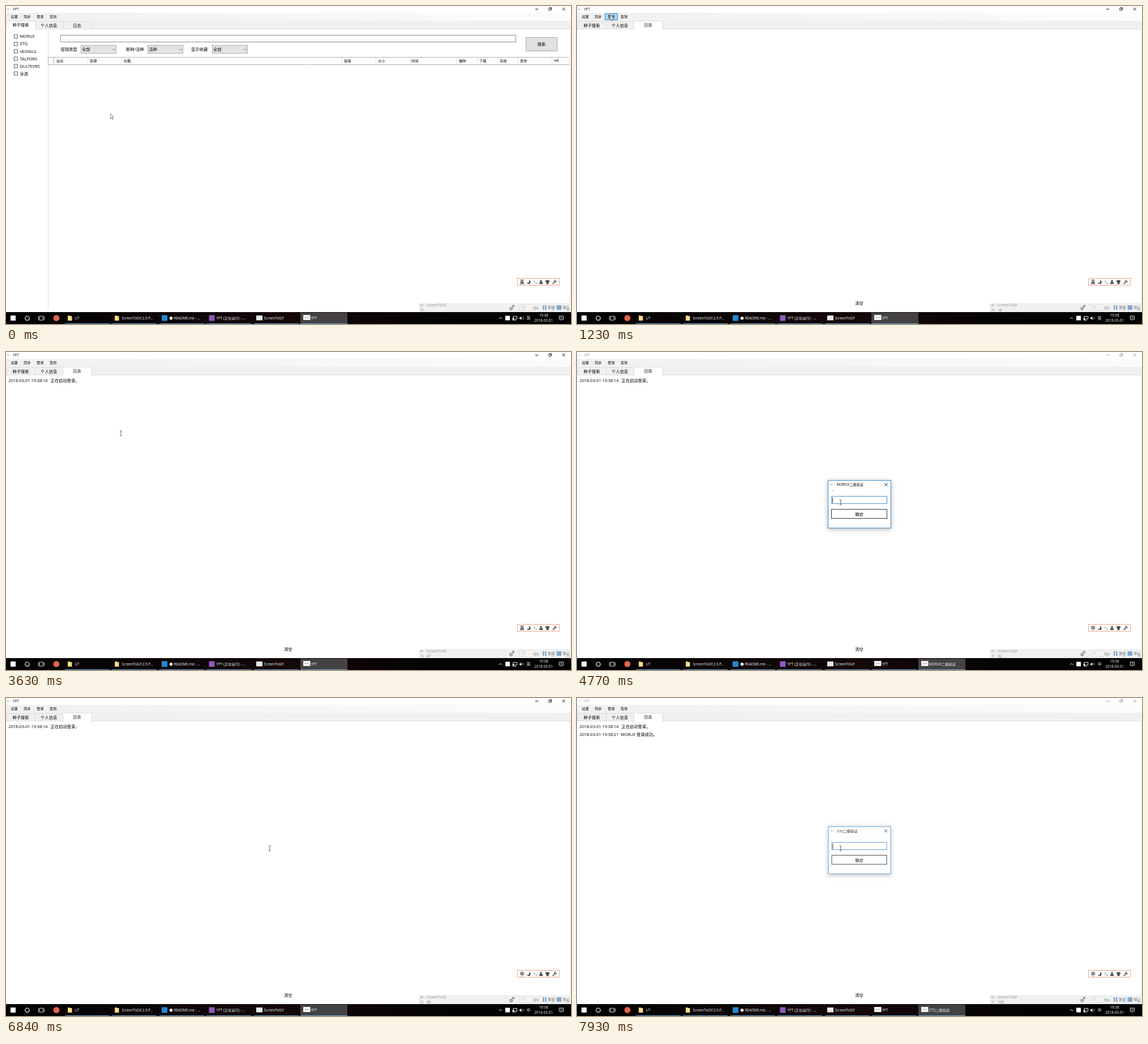
These frames come from a looping animation (998 px wide and 561 px high, 8000 ms). An HTML page with a canvas:

```html
<!DOCTYPE html>
<html lang="zh-CN">
<head>
<meta charset="utf-8">
<title>YPT</title>
<style>
html, body { margin: 0; width: 100%; height: 100%; overflow: hidden; background: #fff; }
canvas { display: block; width: 100vw; height: 100vh; }
</style>
</head>
<body>
<canvas id="stage" width="998" height="561"></canvas>
<script>
const g = document.getElementById('stage').getContext('2d');
const LOOP = 8000, STEP = 1000 / 13;
const FONT = '"Open Sans", "Noto Sans CJK SC", "Noto Sans CJK", sans-serif';
const SMALL = 6.24, BODY = 7.3;
const SITES = ['MORUX', 'ZTQ', 'VEDNILS', 'TALPORS', 'DULTEVRS', '全选'];

function text(s, x, y, size = SMALL, color = '#000', align = 'left', weight = 400) {
  g.font = `${weight} ${size}px ${FONT}`;
  g.fillStyle = color;
  g.textAlign = align;
  g.fillText(s, x, y + size * 0.36);
}
function fill(x, y, w, h, color) {
  g.fillStyle = color;
  g.fillRect(x, y, w, h);
}
function box(x, y, w, h, border, bg) {
  if (bg) fill(x, y, w, h, bg);
  g.strokeStyle = border;
  g.lineWidth = 1;
  g.strokeRect(x + 0.5, y + 0.5, w - 1, h - 1);
}
function line(color, width, ...pts) {
  g.strokeStyle = color;
  g.lineWidth = width;
  g.beginPath();
  for (let i = 0; i < pts.length; i += 2) g.lineTo(pts[i], pts[i + 1]);
  g.stroke();
}
function poly(color, ...pts) {
  g.fillStyle = color;
  g.beginPath();
  for (let i = 0; i < pts.length; i += 2) g.lineTo(pts[i], pts[i + 1]);
  g.closePath();
  g.fill();
}
function disc(x, y, r, color) {
  g.fillStyle = color;
  g.beginPath();
  g.arc(x, y, r, 0, 7);
  g.fill();
}
function ring(x, y, r, color, width = 1) {
  g.strokeStyle = color;
  g.lineWidth = width;
  g.beginPath();
  g.arc(x, y, r, 0, 7);
  g.stroke();
}
function cross(x, y, r, color, width = 0.9) {
  line(color, width, x - r, y - r, x + r, y + r);
  line(color, width, x - r, y + r, x + r, y - r);
}
function blend(...colors) {
  const shade = g.createLinearGradient(0, 0, 998, 0);
  colors.forEach((c, i) => shade.addColorStop(i / (colors.length - 1), c));
  return shade;
}

function titleBar(active) {
  const ink = active ? '#111' : '#999';
  fill(2, 5, 3, 1, active ? '#777' : '#aaa');
  fill(7, 5, 1, 1, '#ccc');
  text('YPT', 12, 5.7, SMALL, ink);
  fill(935, 5, 5, 1, ink);
  g.strokeStyle = ink;
  g.lineWidth = 0.8;
  g.strokeRect(958.8, 4, 3.6, 3.6);
  line(ink, 0.8, 960, 4, 960, 2.8, 963.7, 2.8, 963.7, 6.4, 962.4, 6.4);
  cross(985, 5.4, 2.6, ink);
}

function menu(hover) {
  fill(0, 12, 998, 14, blend('#f0f0f0', '#fcfcfc'));
  if (hover) box(49, 13, 23, 12, '#2a86d0', '#b3d7f3');
  ['设置', '同步', '登录', '签到'].forEach((s, i) => text(s, 8.4 + i * 22.9, 19));
}

function tabs(selected) {
  fill(0, 26, 998, 15, '#f0f0f0');
  line('#dcdcdc', 1, 0, 40.5, 998, 40.5);
  const edges = [1, 51, 101, 150];
  for (let i = 0; i < 3; i++) {
    if (i !== selected) box(edges[i], 27, edges[i + 1] - edges[i] + 1, 14, '#dcdcdc', '#f0f0f0');
  }
  const x = edges[selected] - 1, w = edges[selected + 1] - x + 2;
  box(x, 26, w, 16, '#dcdcdc', '#fff');
  fill(x + 1, 40, w - 2, 3, '#fff');
  ['种子搜索', '个人信息', '日志'].forEach((s, i) =>
    text(s, [26, 75.7, 125.6][i], i === selected ? 33.5 : 34.2, BODY, '#000', 'center'));
}

function combo(label, labelX, x, value) {
  text(label, labelX, 76.7, BODY);
  box(x, 69, 63, 15, '#adadad', '#e3e3e3');
  text(value, x + 2.3, 76.7, BODY);
  line('#444', 0.8, x + 56.3, 75.6, x + 58.5, 77.8, x + 60.7, 75.6);
}

function searchPage() {
  SITES.forEach((s, i) => {
    const y = 53.8 + i * 13.05;
    g.strokeStyle = '#333';
    g.lineWidth = 0.8;
    g.strokeRect(14.3, y - 3, 6, 6);
    text(s, 24.5, y, BODY);
  });
  line('#dcdcdc', 1, 74.5, 43, 74.5, 536);
  box(96, 51, 805, 13, '#8c8c8c', '#fff');
  box(918, 55, 56, 25, '#adadad', '#e1e1e1');
  text('搜索', 945.7, 67.6, BODY, '#000', 'center');
  combo('促销类型', 96.7, 132, '全部');
  combo('断种/活种', 212, 250, '活种');
  combo('显示收藏', 327, 364, '全部');

  line('#b4b4b4', 1, 74, 90.5, 995, 90.5);
  line('#b4b4b4', 1, 74, 103.5, 995, 103.5);
  box(74, 90, 11, 14, '#b4b4b4');
  const heads = { 站点: 85, 资源: 144, 标题: 204, 促销: 593, 大小: 653, 时间: 712,
    做种: 796, 下载: 832, 完成: 868, 发布: 904, HR: 964 };
  for (const [s, x] of Object.entries(heads)) {
    if (x > 85) line('#dedede', 1, x + 0.5, 91, x + 0.5, 103);
    text(s, x + 4, 97.2);
  }
  line('#dedede', 1, 994.5, 91, 994.5, 103);
}

function logPage(rows) {
  if (rows > 0) {
    text('2018-03-01 19:38:14', 4.5, 50.2, BODY);
    text('正在启动登录。', 78.6, 50.2, BODY);
  }
  if (rows > 1) {
    text('2018-03-01 19:38:21', 4.5, 63.9, BODY);
    text(SITES[0] + ' 登录成功。', 77, 63.9, BODY);
  }
  text('清空', 498.5, 524.8, BODY, '#000', 'center');
}

function recorder(count) {
  const ink = '#a4a4a4';
  fill(729, 524, 269, 16, '#f0f0f0');
  line(ink, 0.9, 738.5, 527.8, 732, 527.8);
  line(ink, 0.9, 734.5, 525.3, 732, 527.8, 734.5, 530.3);
  text('ScreenToGif', 743, 528.2, SMALL, '#999');
  cross(734.8, 536, 2.6, '#999', 0.8);
  if (count > 0) text(count, 743.2, 536.3, SMALL, '#6670b0');
  ring(892.3, 533.8, 2, '#808080', 1.6);
  ring(896, 529.3, 1.4, '#808080', 1.4);
  box(906, 526, 25, 12, '#e2e2e2', '#f3f3f3');
  text('15', 909.5, 532.2, SMALL, '#b4b4b4');
  text('fps', 931.8, 532.4, SMALL, '#777');
  fill(948, 528, 2.5, 8, '#83a8cc');
  fill(952, 528, 2.5, 8, '#83a8cc');
  text('暂停', 957, 531.3, SMALL, '#666');
  text('F7', 964, 536.2, 4.6, '#888');
  fill(972.5, 528, 8.5, 8, '#83a8cc');
  text('停止', 983.2, 531.3, SMALL, '#666');
  text('F8', 990, 536.2, 4.6, '#888');
}

function inputBar(lang) {
  const ink = '#444';
  box(903, 480, 75, 13, '#eba58a', '#fff');
  text(lang, 911.6, 487, 7.6, '#333', 'center', 700);
  disc(923.3, 487, 3.3, ink);
  disc(921.7, 485.7, 2.7, '#fff');
  ring(933.2, 486, 0.8, ink, 0.7);
  line(ink, 1, 936.8, 487.8, 936, 490);
  disc(945, 485.2, 1.8, ink);
  fill(942, 487.3, 6, 3, ink);
  poly(ink, 952.5, 485, 954.7, 483.7, 958.2, 483.7, 960.4, 485, 959.4, 487, 958.5, 486.5,
    958.5, 490.5, 954.5, 490.5, 954.5, 486.5, 953.5, 487);
  line(ink, 1.5, 965.6, 490.3, 969.3, 486.6);
  ring(970.5, 485.3, 1.6, ink, 1.3);
  fill(971, 483, 2, 2, '#fff');
}

function folder(x) {
  fill(x, 546, 4, 9, '#e9bd55');
  fill(x + 1, 547, 6.5, 8, '#fbdc8c');
}

function taskButton(x, label, active) {
  if (active) fill(x - 1, 541, 83, 20, '#454243');
  fill(active ? x - 1 : x, 560, active ? 83 : 79, 1, '#6aaee2');
  text(label, x + 17.6, 550.7, SMALL, '#fff');
}

function appIcon(x) {
  fill(x, 545, 12.5, 9, '#f4f4f4');
  fill(x + 2, 549, 8, 1, '#aaa');
}

function taskBar(dialogName, lang) {
  fill(0, 540, 998, 21, blend('#020202', '#0b0506', '#150809', '#050303', '#020202'));
  fill(8, 546, 9, 9, '#fff');
  ring(37.5, 550.7, 3.7, '#fff', 1.2);
  g.strokeStyle = '#e8e8e8';
  g.lineWidth = 0.9;
  g.strokeRect(59, 547.2, 6.5, 7);
  line('#e8e8e8', 0.9, 58, 548, 57.3, 548, 57.3, 553.5, 58, 553.5);
  line('#e8e8e8', 0.9, 66.8, 548, 67.5, 548, 67.5, 553.5, 66.8, 553.5);
  disc(89, 550.5, 5.4, '#e0654c');

  taskButton(104, 'UT');
  taskButton(187, 'ScreenToGif.2.9.P...');
  taskButton(271, '● README.md - ...');
  taskButton(354, 'YPT (正在运行) - ...');
  taskButton(438, 'ScreenToGif');
  taskButton(521, 'YPT', !dialogName);
  folder(109);
  folder(192);
  fill(275, 545.5, 10, 10, '#2389d0');
  fill(358.5, 545.5, 10, 10, '#8b5cb5');
  fill(442, 546, 11, 8.5, '#e6e8ea');
  appIcon(525);
  if (dialogName) {
    taskButton(604, dialogName + '二级验证', true);
    appIcon(608);
  }

  const ink = '#eee';
  line(ink, 1, 870.8, 552, 873.5, 549.2, 876.2, 552);
  fill(882, 546.5, 8, 8, '#fff');
  g.strokeStyle = ink;
  g.lineWidth = 0.9;
  g.strokeRect(896, 547.5, 6.5, 4.7);
  line(ink, 0.9, 897, 554.4, 901, 554.4);
  fill(894.7, 550, 2.4, 4.5, ink);
  poly(ink, 907, 549.5, 908.4, 549.5, 910.5, 547.5, 910.5, 554, 908.4, 552, 907, 552);
  for (const r of [2, 3.8]) {
    g.strokeStyle = '#aaa';
    g.lineWidth = 0.7;
    g.beginPath();
    g.arc(910.5, 550.7, r, -0.8, 0.8);
    g.stroke();
  }
  text(lang, 923, 550.7, 7, '#fff', 'center');
  text('19:38', 949.5, 546, SMALL, '#fff', 'center');
  text('2018-03-01', 949.5, 555.2, SMALL, '#fff', 'center');
  line(ink, 0.9, 977.3, 547, 984.7, 547, 984.7, 552.8, 982.3, 552.8, 981, 554.6, 979.7, 552.8, 977.3, 552.8, 977.3, 546.6);
  line(ink, 0.6, 979, 549, 983, 549);
  line(ink, 0.6, 979, 551, 983, 551);
}

function dialog(name, value, caret, alpha, speck) {
  const k = 0.93 + 0.07 * alpha;
  g.save();
  g.globalAlpha = alpha;
  g.translate(498.75, 268.5);
  g.scale(k, k);
  g.translate(-498.75, -268.5);
  g.save();
  g.shadowColor = 'rgba(0,0,0,0.28)';
  g.shadowBlur = 8;
  g.shadowOffsetY = 2;
  fill(443, 226, 112, 85, '#fff');
  g.restore();
  box(443, 226, 112, 85, '#3d8fd1', '#fff');
  fill(448, 233.5, 3, 1, '#777');
  fill(453, 233.5, 1, 1, '#ccc');
  text(name + '二级验证', 458.6, 234.2);
  cross(546, 234, 2.7, '#222');
  if (speck) fill(451, 244, 2.5, 1, '#999');
  box(449, 254, 99, 14, '#4a94d4', '#fff');
  text(value, 450.8, 261.7, BODY);
  if (caret) {
    g.font = `400 ${BODY}px ${FONT}`;
    fill(451 + g.measureText(value).width, 256.5, 0.9, 10, '#111');
  }
  box(449, 277, 99, 17, '#333', '#fff');
  text('确定', 498.5, 286.2, BODY, '#000', 'center');
  g.restore();
}

function arrow(x, y) {
  const shape = [0, 0, 0, 8.6, 2, 6.8, 3.4, 10, 4.7, 9.4, 3.4, 6.4, 6, 6.2]
    .map((v, i) => v + (i % 2 ? y : x));
  poly('#fff', ...shape);
  line('#444', 0.65, ...shape, x, y);
}
function beam(x, y) {
  line('#333', 0.8, x, y - 4, x, y + 4);
  for (const s of [-1, 1]) {
    line('#333', 0.7, x - 2, y + 4.5 * s, x - 0.5, y + 4.5 * s, x, y + 4 * s,
      x + 0.5, y + 4.5 * s, x + 2, y + 4.5 * s);
  }
}

// Pointer stops: time, x, y
const PATH = [[150, 184.5, 190], [770, 58.8, 16], [1400, 58.8, 16], [1690, 171, 123],
  [1920, 203, 143.3], [3760, 203, 143.3], [4230, 465.7, 265.3]];
function pointer(t) {
  const i = PATH.findIndex(p => p[0] > t);
  if (i === 0) return PATH[0].slice(1);
  if (i < 0) return PATH[PATH.length - 1].slice(1);
  const [a, b] = [PATH[i - 1], PATH[i]];
  const u = (t - a[0]) / (b[0] - a[0]), e = u * u * (3 - 2 * u);
  return [a[1] + (b[1] - a[1]) * e, a[2] + (b[2] - a[2]) * e];
}

const KEYS = [5210, 5440, 5680, 5910, 6130, 6380];
const OPEN = 3680, CLOSE = 6840, REOPEN = 7840;
const clamp = v => Math.max(0, Math.min(1, v));

function draw(ms) {
  const n = Math.floor(ms / STEP + 0.15), t = n * STEP;
  const [px, py] = pointer(t);
  const onLog = t >= 1070;
  const first = t >= OPEN && t < CLOSE, second = t >= REOPEN;
  const focused = !(t >= OPEN && t < 6680 || second);
  const lang = t >= 3750 && t < 6980 || second ? '中' : '英';
  const name = focused ? '' : SITES[second ? 1 : 0];

  fill(0, 0, 998, 561, '#fff');
  titleBar(focused);
  menu(px > 49 && px < 72 && py < 25);
  tabs(onLog ? 2 : 0);
  if (onLog) logPage(t < 1300 ? 0 : t < 7760 ? 1 : 2);
  else searchPage();
  line('#dcdcdc', 1, 997.5, 41, 997.5, 540);
  recorder(n);
  inputBar(lang);
  taskBar(name, lang);

  if (first) {
    const typed = KEYS.filter(k => k <= t).length;
    const since = t - (typed ? KEYS[typed - 1] : OPEN);
    const alpha = Math.min(clamp((t - 3600) / 230), clamp((CLOSE - t) / 150));
    dialog(name || SITES[0], '631784'.slice(0, typed), since % 1060 < 530, alpha, t < 5000);
  }
  if (second) dialog(name, '', true, clamp((t - 7750) / 200), false);

  const hidden = t >= KEYS[0] && t < CLOSE;
  if (hidden) return;
  const overText = onLog && py > 41 && !(first && py > 270);
  (overText ? beam : arrow)(px, py);
}

function tick(now) {
  draw(now % LOOP);
  requestAnimationFrame(tick);
}
draw(0);
requestAnimationFrame(tick);
</script>
</body>
</html>
```
